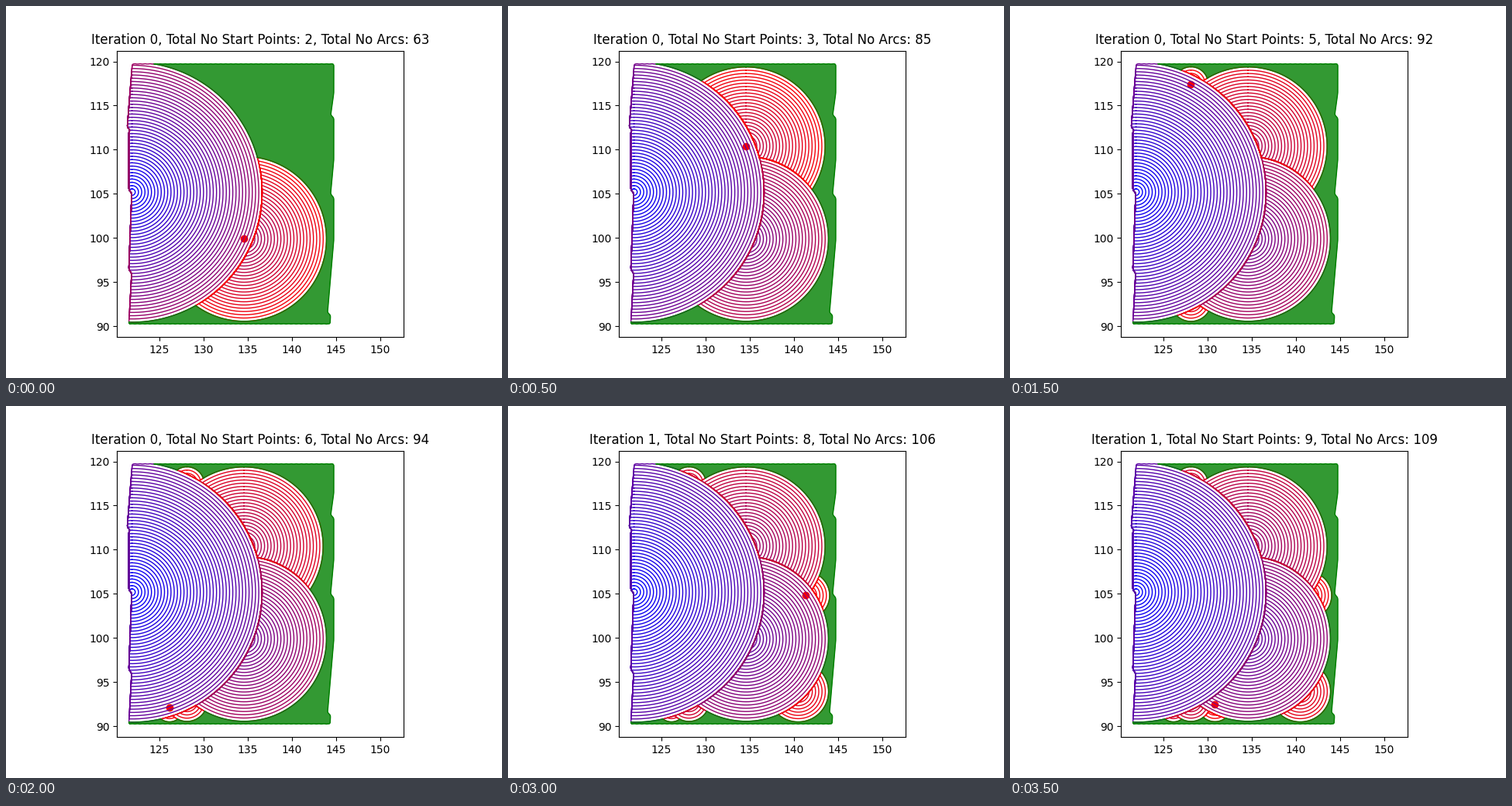
Recreate the animation shown at these times as a matplotlib script. Size 640 px wide and 480 px high, loop 4 s.

```python
import numpy as np
import matplotlib.pyplot as plt
from matplotlib.animation import FuncAnimation
from matplotlib.path import Path

STEP = 0.3686     # distance between neighbouring arcs
OFFSET = 1.229    # first radius of every start point but the first
MOST = 40         # arcs allowed around one start point
LEFT, BOTTOM, SIDE = 120.20, 88.765, 32.46

STARTS = [(121.90, 105.195), (134.60, 99.895), (134.59, 110.405),
          (128.13, 92.875), (128.13, 117.425), (126.15, 92.085),
          (140.51, 93.925), (141.37, 104.815), (130.85, 92.475)]

# Toothed sides of the area, upwards on the left, downwards on the right
LOW, HIGH = 90.235, 119.745
TEETH = [(121.54, LOW), (121.87, 96.0), (121.54, 96.4), (121.88, 105.05),
         (121.54, 105.45), (121.54, 112.1), (121.74, 112.2), (121.36, 112.5),
         (121.93, HIGH),
         (144.77, HIGH), (144.77, 116.45), (144.41, 113.9), (144.77, 113.65),
         (144.77, 108.9), (144.40, 104.95), (144.77, 104.6), (144.77, 99.8),
         (144.05, 91.5), (144.40, 91.3), (144.36, LOW)]


def trace_outline():
    """Closed border with corners rounded by a moving average."""
    pts = np.array(TEETH + TEETH[:1])
    run = np.r_[0, np.cumsum(np.hypot(*np.diff(pts, axis=0).T))]
    t = np.arange(0, run[-1], 0.02)
    width = 27
    x, y = (np.convolve(np.pad(np.interp(t, run, c), width // 2, "wrap"),
                        np.ones(width) / width, "valid") for c in pts.T)
    # slightly scalloped top and bottom edges
    wave = 0.04 * np.abs(np.sin(5.5 * x))
    y = np.clip(y, LOW + wave, HIGH - wave)
    pts = np.c_[x, y]
    return np.vstack([pts, pts[:1]])


def circle(center, r):
    a = np.pi / 2 + np.linspace(0, 2 * np.pi, 1500)
    return np.c_[center[0] + r * np.cos(a), center[1] + r * np.sin(a)]


def distance(pts, center):
    return np.hypot(*(pts - center).T)


def radii(n):
    """Arcs grow until they would touch the border; the first set crosses it."""
    if n == 0:
        return STEP * np.arange(1, MOST + 1)
    return np.arange(OFFSET, distance(outline, STARTS[n]).min(), STEP)


def cut(pts, keep):
    """Keep the chosen points, with one gap after each run."""
    out = np.where(keep[:, None], pts, np.nan)
    return np.vstack([out[keep | np.roll(keep, 1)], [[np.nan, np.nan]]])


def uncovered(pts, n, skip=None):
    keep = np.ones(len(pts), bool)
    for i in range(n):
        if i != skip:
            keep &= distance(pts, STARTS[i]) >= rings[i][-1]
    return keep


def rim(n):
    """Border of the space left over after n start points."""
    parts = [cut(outline, uncovered(outline, n))]
    for i in range(n):
        pts = circle(STARTS[i], rings[i][-1])
        keep = area.contains_points(pts) & uncovered(pts, n, i)
        parts.append(cut(pts, keep))
    return np.vstack(parts)


def arcs(n):
    """Closed arcs around start point n inside the space left over."""
    for r in rings[n]:
        pts = circle(STARTS[n], r)
        keep = area.contains_points(pts) & uncovered(pts, n)
        inside = distance(rims[n], STARTS[n]) < r
        yield np.vstack([cut(pts, keep), cut(rims[n], inside)])


outline = trace_outline()
area = Path(outline)
rings = [radii(n) for n in range(len(STARTS))]
rims = [rim(n) for n in range(len(STARTS) + 1)]

fig, ax = plt.subplots(figsize=(6.4, 4.8), dpi=100)
ax.set_aspect("equal")
ax.set_xlim(LEFT, LEFT + SIDE)
ax.set_ylim(BOTTOM, BOTTOM + SIDE)
ax.set_xticks(range(125, 151, 5))
ax.set_yticks(range(90, 121, 5))

ax.fill(*outline.T, color="g", alpha=0.8, linewidth=0.5)
holes = [ax.add_patch(plt.Circle(s, r[-1], color="w", linewidth=0))
         for s, r in zip(STARTS, rings)]
dot = ax.scatter([0], [0], color="r", linewidth=1)
lines = [ax.plot(*pts.T, linewidth=1)[0]
         for n in range(len(STARTS)) for pts in arcs(n)]
edge, = ax.plot([], [], color="g", linewidth=1)
title = ax.set_title("")


def draw(frame):
    n = frame + 2
    total = sum(len(r) for r in rings[:n])
    for i, hole in enumerate(holes):
        hole.set_visible(i < n)
    for i, line in enumerate(lines):
        line.set_visible(i < total)
        if i < total:
            line.set_color((i / total, 0, 1 - i / total))
    dot.set_offsets([STARTS[n - 1]])
    edge.set_data(*rims[n].T)
    title.set_text(f"Iteration {int(n > 6)}, Total No Start Points: {n}, "
                   f"Total No Arcs: {total}")
    return [*holes, *lines, dot, edge, title]


anim = FuncAnimation(fig, draw, frames=len(STARTS) - 1, interval=500,
                     init_func=lambda: draw(0), repeat=True, repeat_delay=0)
plt.show()
```
